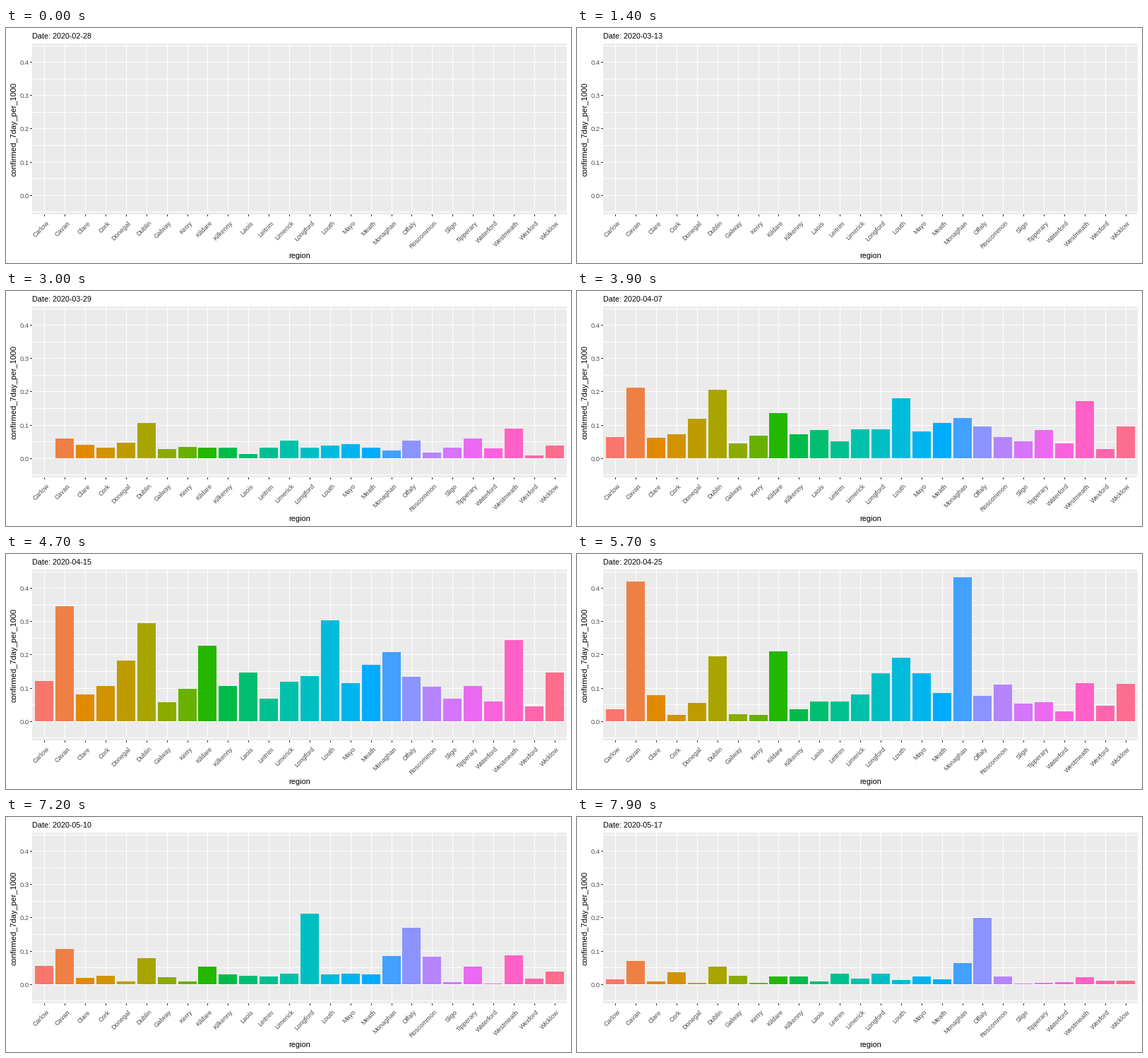
Write a matplotlib script that moves like this. It is 800 by 333 pixels and loops after 8 s.

```python
import matplotlib.pyplot as plt
import numpy as np
from matplotlib.animation import FuncAnimation
from matplotlib.patches import Rectangle

W, H, DPI = 800, 333, 72
FRAMES, STEP = 80, 100
LEFT, RIGHT, TOP, BOTTOM = 37, 794, 22, 264
ZERO, SCALE = 237.25, 471.5          # pixel row of 0 and pixels per unit

# Rates in thousandths on the days listed in DAYS
DAYS = [30, 47, 57, 65, 79]
RATES = {
    "Carlow": (0, 120, 37, 94, 15),
    "Cavan": (60, 346, 420, 143, 70),
    "Clare": (41, 81, 79, 28, 9),
    "Cork": (32, 107, 20, 15, 37),
    "Donegal": (47, 183, 56, 13, 4),
    "Dublin": (107, 295, 195, 104, 54),
    "Galway": (28, 58, 22, 15, 26),
    "Kerry": (34, 98, 20, 11, 4),
    "Kildare": (31, 227, 210, 83, 24),
    "Kilkenny": (32, 107, 35, 34, 24),
    "Laois": (13, 147, 60, 41, 9),
    "Leitrim": (32, 68, 60, 15, 32),
    "Limerick": (52, 119, 81, 45, 17),
    "Longford": (31, 135, 145, 393, 32),
    "Louth": (39, 304, 191, 47, 13),
    "Mayo": (43, 115, 145, 39, 24),
    "Meath": (32, 170, 85, 45, 15),
    "Monaghan": (24, 208, 433, 105, 64),
    "Offaly": (52, 134, 77, 138, 200),
    "Roscommon": (18, 104, 111, 143, 24),
    "Sligo": (32, 68, 54, 11, 2),
    "Tipperary": (60, 107, 58, 102, 4),
    "Waterford": (29, 60, 29, 2, 7),
    "Westmeath": (90, 244, 115, 151, 21),
    "Wexford": (9.5, 45, 47, 22, 11),
    "Wicklow": (39, 147, 113, 66, 11),
}
FIRST, LAST = 23, 29                 # window still holding the first batch


def series(name):
    """Daily rates: nothing at first, a batch jump, then the rolling curve."""
    v = RATES[name]
    early = (0.45 * v[0], 1.25 * v[0]) if v[0] else (7, 7)
    t = np.arange(FRAMES)
    y = np.interp(t, [FIRST, LAST] + DAYS, early + v)
    y[:FIRST] = 0
    if name == "Waterford":          # brief downward correction
        y -= 11 * np.clip(1 - abs(t - 69) / 4, 0, 1)
    return y / 1000


def hcl(h, c=100, l=65):
    """Polar LUV colour to clipped sRGB."""
    a = np.radians(h)
    y = ((l + 16) / 116) ** 3
    u = c * np.cos(a) / (13 * l) + 0.1978398
    v = c * np.sin(a) / (13 * l) + 0.4683363
    x = 9 * y * u / (4 * v)
    z = -x / 3 - 5 * y + 3 * y / v
    rgb = np.array([3.240479 * x - 1.537150 * y - 0.498535 * z,
                    -0.969256 * x + 1.875992 * y + 0.041556 * z,
                    0.055648 * x - 0.204043 * y + 1.057311 * z])
    lin = np.clip(rgb, 0, 1)
    return np.where(lin > 0.00304, 1.055 * lin ** (1 / 2.4) - 0.055, 12.92 * lin)


plt.rcParams["font.family"] = "Liberation Sans"
fig = plt.figure(figsize=(W / DPI, H / DPI), dpi=DPI, facecolor="white")
ax = fig.add_axes([0, 0, 1, 1])
ax.set_xlim(0, W)
ax.set_ylim(H, 0)
ax.axis("off")


def rect(x, y, w, h, color):
    return ax.add_patch(Rectangle((x, y), w, h, facecolor=color, linewidth=0))


def label(x, y, s, size=11, color="black", **kw):
    return ax.text(x, y, s, fontsize=size, color=color,
                   va="baseline", rotation_mode="anchor", **kw)


def row(v):
    return np.floor(ZERO - SCALE * v)


rect(LEFT, TOP, RIGHT - LEFT, BOTTOM - TOP, "#EBEBEB")
for k in range(-1, 10):
    rect(LEFT, row(k * 0.05), RIGHT - LEFT, 1, "white")
for k in range(5):
    y = row(k * 0.1)
    rect(LEFT - 3, y, 3, 1, "#333333")
    label(32.4, y + 4, f"{k * 0.1:.1f}", 9.3, "#4D4D4D", ha="right")

names = list(RATES)
pitch = (RIGHT - LEFT) / (len(names) + 0.2)
centers = LEFT + pitch * (np.arange(len(names)) + 0.6)
for x, name in zip(centers, names):
    rect(np.rint(x), TOP, 1, BOTTOM - TOP, "white")
    rect(np.rint(x), BOTTOM, 1, 3, "#333333")
    label(x + 7.6, 276.9, name, 9.1, "#4D4D4D", ha="right", rotation=45)

bars = [rect(x - 0.45 * pitch, np.floor(ZERO), 0.9 * pitch, 0,
             hcl(15 + 360 * i / len(names))) for i, x in enumerate(centers)]
rates = np.array([series(n) for n in names])

label(415.5, 326, "region", ha="center")
label(15, 143.3, "confirmed_7day_per_1000", 11.1, ha="center", rotation=90)
title = label(LEFT - 0.3, 15, "", 10.8)
start = np.datetime64("2020-02-28")


def update(n):
    title.set_text(f"Date: {start + n}")
    for bar, v in zip(bars, rates[:, n]):
        bar.set_height(-SCALE * v)
    return [title, *bars]


anim = FuncAnimation(fig, update, frames=FRAMES, interval=STEP,
                     repeat=True, repeat_delay=0, blit=False)
plt.show()
```
